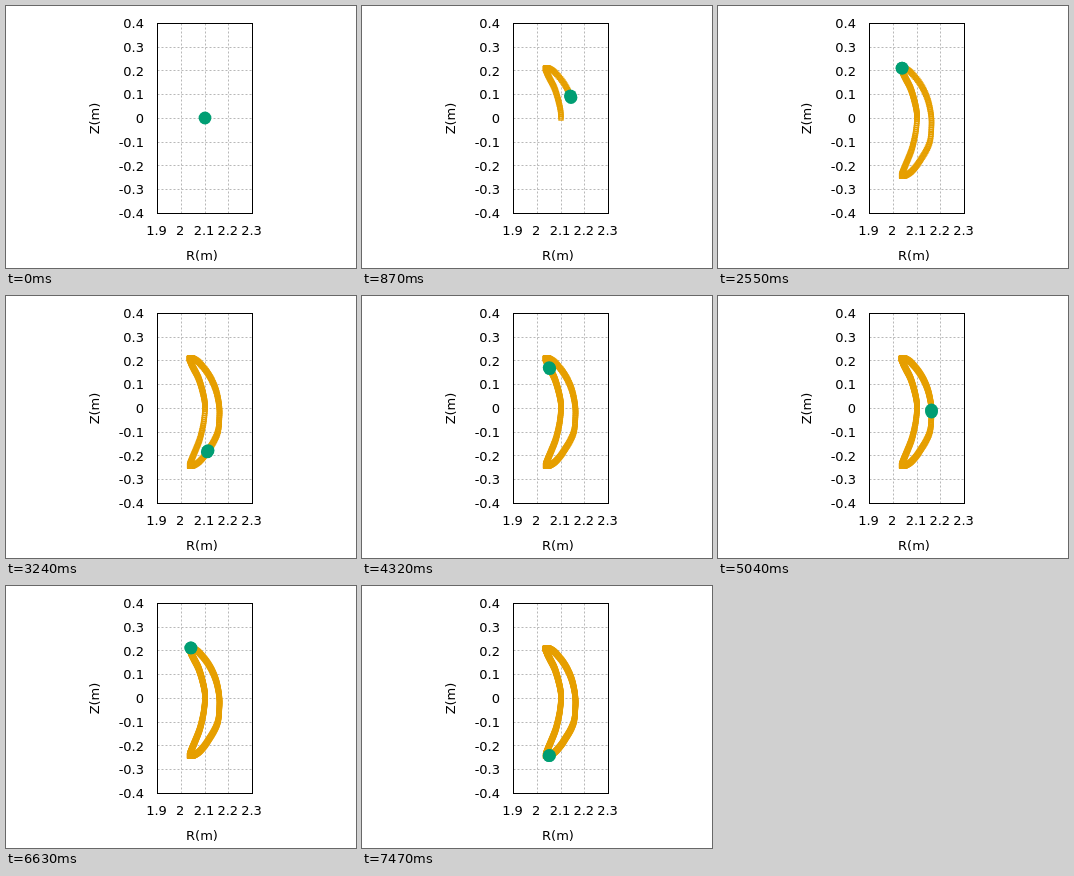
An HTML page with a canvas that plays this animation: 350x262 px, repeating every 7.5 s.

```html
<!DOCTYPE html>
<html>
<head>
<meta charset="utf-8">
<style>
html, body { margin: 0; width: 100%; height: 100%; overflow: hidden; background: #fff; }
canvas { display: block; }
</style>
</head>
<body>
<canvas id="stage" width="350" height="262"></canvas>
<script>
const ctx = document.getElementById('stage').getContext('2d');
const LOOP = 7500, FRAME = 30, STEP = 10, PERIOD = 2017;
const LEFT = 151.5, RIGHT = 246.5, TOP = 17.5, BOTTOM = 207.5;

// One turn of the orbit: [time in ms, x, y]
const knots = [
  [0, 199, 112], [60, 198, 101.5], [180, 193, 83.5], [280, 187.5, 72.2],
  [320, 185.7, 68.5], [400, 184, 64], [500, 183.7, 62.3], [640, 187, 62.5],
  [700, 192.5, 66], [780, 202, 77.5], [870, 209, 91.5], [960, 212.8, 107],
  [1020, 213.5, 119], [1100, 211.5, 137], [1220, 201.5, 155.5],
  [1310, 194, 165], [1410, 187.5, 169.5], [1500, 184, 170.2],
  [1590, 184, 168.3], [1690, 186.3, 162], [1830, 193, 145.5],
  [1880, 195.2, 138], [1950, 197.8, 125.5]
];

function knot(i) {
  const n = knots.length, turn = Math.floor(i / n);
  const [t, x, y] = knots[i - turn * n];
  return [t + turn * PERIOD, x, y];
}

// Smooth curve through the knots, with slopes taken over time
function orbit(time) {
  const t = time % PERIOD;
  let i = knots.length - 1;
  while (knots[i][0] > t) i--;
  const [a, b, c, d] = [i - 1, i, i + 1, i + 2].map(knot);
  const span = c[0] - b[0], u = (t - b[0]) / span;
  return [1, 2].map(k => {
    const m0 = (c[k] - a[k]) / (c[0] - a[0]) * span;
    const m1 = (d[k] - b[k]) / (d[0] - b[0]) * span;
    const rise = c[k] - b[k];
    return b[k] + u * (m0 + u * (3 * rise - 2 * m0 - m1 + u * (m0 + m1 - 2 * rise)));
  });
}

const points = Array.from({ length: LOOP / STEP }, (_, i) => orbit(i * STEP));

function line(x1, y1, x2, y2) {
  ctx.beginPath();
  ctx.moveTo(x1, y1);
  ctx.lineTo(x2, y2);
  ctx.stroke();
}

function drawGrid() {
  ctx.lineWidth = 1;
  ctx.strokeStyle = '#b8b8b8';
  ctx.setLineDash([2, 2]);
  for (const x of [175.5, 199.5, 222.5]) line(x, BOTTOM, x, TOP);
  for (let i = 1; i < 8; i++) {
    const y = Math.floor(17.3 + i * 23.75) + 0.5;
    line(LEFT, y, RIGHT, y);
  }
  ctx.setLineDash([]);
}

function drawLabels() {
  ctx.fillStyle = '#000';
  ctx.font = '13px "DejaVu Sans", sans-serif';
  ctx.textAlign = 'right';
  for (let i = 0; i < 9; i++) {
    ctx.fillText(String((4 - i) / 10), 138, Math.round(22 + i * 23.75));
  }
  ctx.textAlign = 'center';
  for (let i = 0; i < 5; i++) {
    ctx.fillText(String((19 + i) / 10), 150.5 + i * 23.75, 229);
  }
  ctx.fillText('R(m)', 196, 254);
  ctx.save();
  ctx.translate(93, 112.5);
  ctx.rotate(-Math.PI / 2);
  ctx.fillText('Z(m)', 0, 0);
  ctx.restore();
}

function drawOrbit(last) {
  ctx.strokeStyle = '#e69f00';
  ctx.lineWidth = 1.4;
  for (const [x, y] of points.slice(0, last + 1)) ctx.strokeRect(x - 2, y - 2, 4, 4);
  ctx.fillStyle = '#009e73';
  for (const [x, y] of points.slice(Math.max(0, last - 1), last + 1)) {
    ctx.beginPath();
    ctx.arc(x, y, 6.4, 0, 2 * Math.PI);
    ctx.fill();
  }
}

function draw(now) {
  const time = Math.floor((now % LOOP) / FRAME) * FRAME;
  ctx.fillStyle = '#fff';
  ctx.fillRect(0, 0, 350, 262);
  drawGrid();
  drawLabels();
  drawOrbit(time / STEP);
  ctx.strokeStyle = '#000';
  ctx.lineWidth = 1;
  ctx.strokeRect(LEFT, TOP, RIGHT - LEFT, BOTTOM - TOP);
}

let start;
function tick(now) {
  start ??= now;
  draw(now - start);
  requestAnimationFrame(tick);
}
draw(0);
requestAnimationFrame(tick);
</script>
</body>
</html>
```
